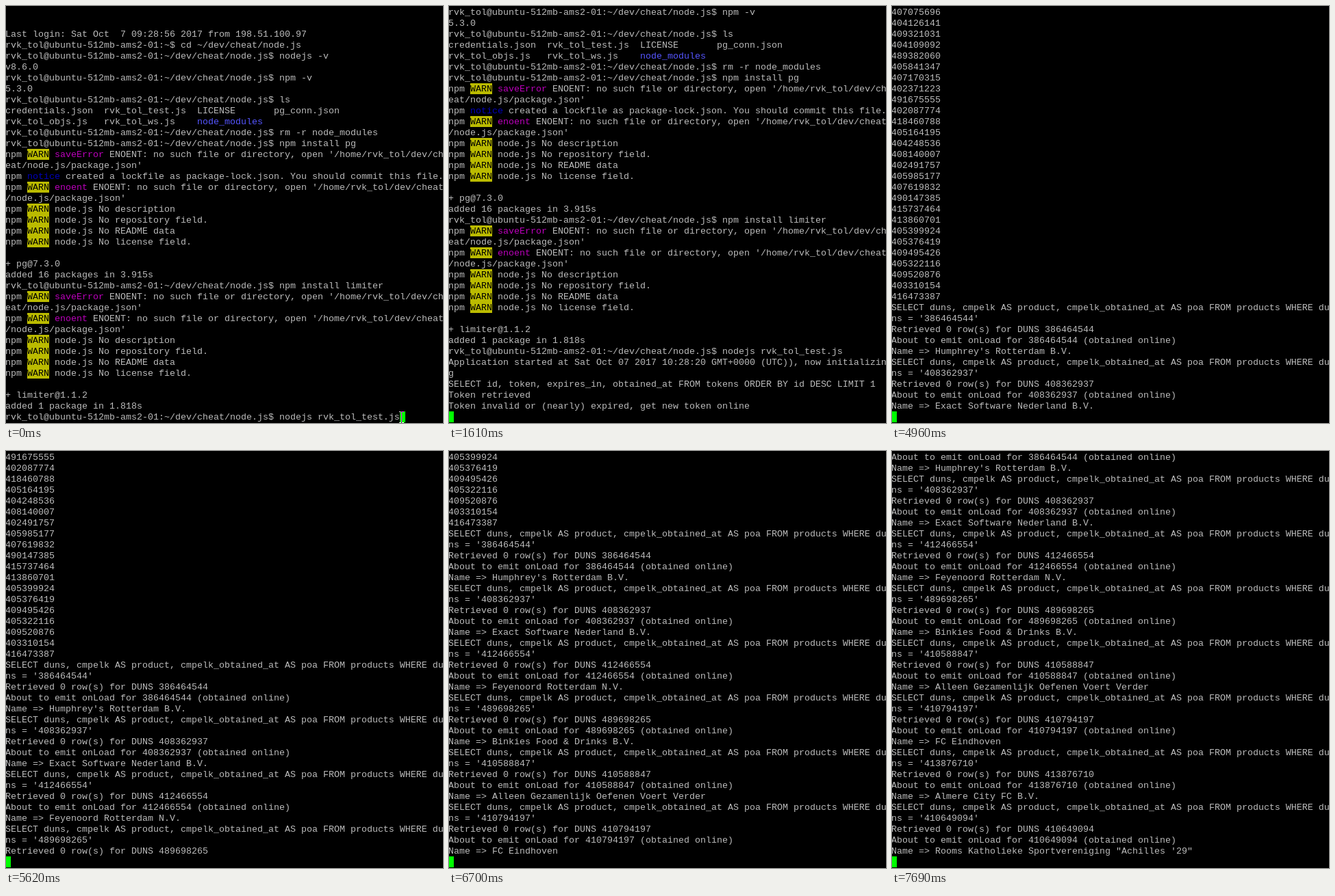
An HTML page that plays this animation: 638 px wide and 610 px high, repeating every 8000 ms.

```html
<!DOCTYPE html>
<html lang="en">
<head>
<meta charset="utf-8">
<title>Terminal session</title>
<style>
  html, body { margin: 0; width: 100%; height: 100%; overflow: hidden; background: #000; }
  #stage { position: relative; width: 638px; height: 610px; overflow: clip; contain: paint; background: #000; }
  #term {
    position: absolute; left: -1px; top: 1px; width: 639px; height: 608px;
    color: #bbb; font: 13.333px/17px "Liberation Mono", "Courier New", monospace;
    font-variant-ligatures: none; white-space: pre;
  }
  .row { height: 16px; }
  .warn { display: inline-block; height: 16px; color: #000; background: #bb0; }
  .code { color: #b0b; }
  .notice { color: #00b; }
  .dir { color: #55f; }
  #cursor { position: absolute; top: 592px; width: 8px; height: 16px; background: #0f0; }
  #pointer { position: absolute; left: 574px; top: 593px; mix-blend-mode: difference; }
</style>
</head>
<body>
<div id="stage">
  <div id="term"><div id="rows"></div><div id="cursor"></div></div>
  <svg id="pointer" width="7" height="17">
    <path d="M0 0h3v1h-3zM4 0h3v1h-3zM3 1h1v15h-1zM0 16h3v1h-3zM4 16h3v1h-3z" fill="#fff"/>
  </svg>
</div>
<script>
const LOOP = 8000, ROWS = 38, COLS = 80, POINTER_OFF = 160;
const user = "rvk_tol";
const host = `${user}@ubuntu-512mb-ams2-01`;
const prompt = `${host}:~/dev/cheat/node.js$ `;

const warning = kind =>
  `npm WARN ${kind} ENOENT: no such file or directory, open '/home/${user}/dev/cheat/node.js/package.json'\n`;
const missing = ["description", "repository field.", "README data", "license field."]
  .map(what => `npm WARN node.js No ${what}\n`).join("");

const session = `

Last login: Sat Oct  7 09:28:56 2017 from 198.51.100.97
${host}:~$ cd ~/dev/cheat/node.js
${prompt}nodejs -v
v8.6.0
${prompt}npm -v
5.3.0
${prompt}ls
credentials.json  ${user}_test.js  LICENSE       pg_conn.json
${user}_objs.js   ${user}_ws.js    node_modules
${prompt}rm -r node_modules
${prompt}npm install pg
${warning("saveError")}npm notice created a lockfile as package-lock.json. You should commit this file.
${warning("enoent")}${missing}
+ pg@7.3.0
added 16 packages in 3.915s
${prompt}npm install limiter
${warning("saveError")}${warning("enoent")}${missing}
+ limiter@1.1.2
added 1 package in 1.818s
${prompt}nodejs ${user}_test.js`;

const ids = `489268635 489263774 490205888 400414039 402204965 9107392 106572964
407075696 404126141 409321031 404109092 489382060 405841347 407170315 402371223
491675555 402087774 418460788 405164195 404248536 408140007 402491757 405985177
407619832 490147385 415737464 413860701 405399924 405376419 409495426 405322116
409520876 403310154 416473387`.split(/\s+/).join("\n") + "\n";

// DUNS, name, then the times of query, result and load
const companies = [
  [386464544, "Humphrey's Rotterdam B.V.", 4190, 4190, 4430],
  [408362937, "Exact Software Nederland B.V.", 4670, 4670, 4960],
  [412466554, "Feyenoord Rotterdam N.V.", 5140, 5140, 5310],
  [489698265, "Binkies Food & Drinks B.V.", 5620, 5620, 5770],
  [410588847, "Alleen Gezamenlijk Oefenen Voert Verder", 6080, 6080, 6240],
  [410794197, "FC Eindhoven", 6550, 6620, 6700],
  [413876710, "Almere City FC B.V.", 7010, 7080, 7150],
  [410649094, "Rooms Katholieke Sportvereniging \"Achilles '29\"", 7540, 7540, 7690]
];

// Output stream: time and the text printed then
const prints = [
  [0, session],
  [1320, "\n"],
  [1560, "Application started at Sat Oct 07 2017 10:28:20 GMT+0000 (UTC)), now initializing\n" +
         "SELECT id, token, expires_in, obtained_at FROM tokens ORDER BY id DESC LIMIT 1\n"],
  [1610, "Token retrieved\nToken invalid or (nearly) expired, get new token online\n"],
  [4190, ids],
  ...companies.flatMap(([duns, name, query, result, load]) => [
    [query, `SELECT duns, cmpelk AS product, cmpelk_obtained_at AS poa FROM products WHERE duns = '${duns}'\n`],
    [result, `Retrieved 0 row(s) for DUNS ${duns}\n`],
    [load, `About to emit onLoad for ${duns} (obtained online)\nName => ${name}\n`]
  ])
];

const wrap = line => line.match(new RegExp(`.{1,${COLS}}`, "g")) || [""];
const span = (cls, text) => `<span class="${cls}">${text}</span>`;

function paint(line) {
  const html = line.replace(/&/g, "&amp;");
  if (html.startsWith("npm ")) {
    return html
      .replace("WARN", span("warn", "WARN"))
      .replace(/saveError|enoent/, word => span("code", word))
      .replace("notice", span("notice", "notice"));
  }
  return html.replace(/ {2}node_modules$/, "  " + span("dir", "node_modules"));
}

let stream = "";
const screens = prints.map(([at, text]) => {
  stream += text;
  const lines = stream.split("\n").flatMap(wrap).slice(-ROWS);
  return {
    at,
    column: lines[lines.length - 1].length,
    html: lines.map(line => `<div class="row">${paint(line)}</div>`).join("")
  };
});

const [rows, cursor, pointer] = ["rows", "cursor", "pointer"].map(id => document.getElementById(id));
let shown = null;

function tick() {
  const t = performance.now() % LOOP;
  const screen = screens.filter(s => s.at <= t).pop();
  if (screen !== shown) {
    rows.innerHTML = screen.html;
    cursor.style.left = screen.column * 8 + "px";
    shown = screen;
  }
  pointer.style.visibility = t < POINTER_OFF ? "visible" : "hidden";
  requestAnimationFrame(tick);
}
tick();
</script>
</body>
</html>
```
